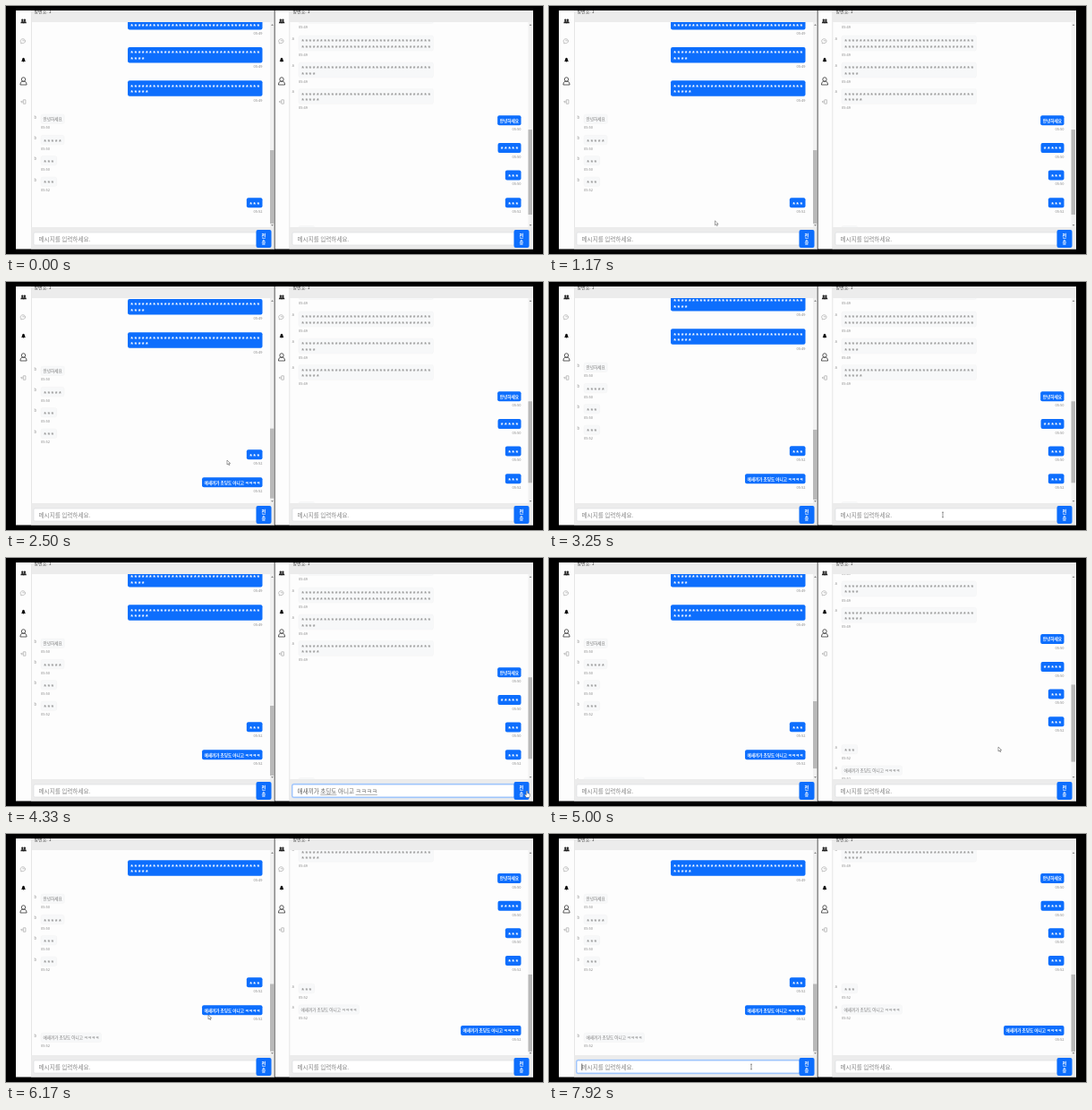
Animation, 600 px wide and 277 px high, one loop 8000 ms. Source, as an HTML page with a canvas:

```html
<!DOCTYPE html>
<html lang="ko">
<head>
<meta charset="utf-8">
<style>
html, body { margin: 0; width: 100%; height: 100%; overflow: hidden; background: #000; }
canvas { display: block; }
</style>
</head>
<body>
<canvas id="stage" width="600" height="277"></canvas>
<script>
const ctx = document.getElementById('stage').getContext('2d');
const LOOP = 8000, BLUE = '#0d6efd', PITCH = 4.15, PER_LINE = 35, PAD = 2.6;
const FONT = '"Noto Sans CJK KR", "Noto Sans CJK", sans-serif';
const VIEW = { top: 18, bottom: 247, height: 229 };
const INSULT = '애새끼가 초딩도 아니고 ㅋㅋㅋㅋ', HELLO = '안녕하세요';
const SEND_LEFT = 2080, SEND_RIGHT = 4420;

// Messages: [top, own, text or number of stars, time, appears at]
const panels = [
  {
    x: 11, rail: 28, own: 286.5, other: 39, name: 'b', input: 31, inputEnd: 280, bar: 295, end: 300, base: 383,
    messages: [
      [9, 1, 70, '05:49'], [46, 1, 39, '05:49'], [83.3, 1, 40, '05:49'],
      [121, 0, HELLO, '05:50'], [144.3, 0, 5, '05:50'], [167.5, 0, 3, '05:50'], [191, 0, 3, '05:52'],
      [214.3, 1, 3, '05:52'], [245.2, 1, INSULT, '05:52', SEND_LEFT], [276, 0, INSULT, '05:52', SEND_RIGHT + 90]
    ],
    content: t => 612 + (t >= SEND_LEFT) * 31 + (t >= SEND_RIGHT + 90) * 24,
    scroll: t => 27 * ease(t, 2250, 2480) + 4 * ease(t, 2520, 2680) + 23 * ease(t, 5880, 6160),
    focused: t => t >= 1250 && t < SEND_LEFT || t >= 7500,
    typed: t => t < SEND_LEFT ? typing(t, 1330, 1800) : ''
  },
  {
    x: 301, rail: 316.5, own: 575.5, other: 327, name: 'a', input: 320, inputEnd: 568, bar: 583.5, end: 589, base: 275,
    messages: [
      [2.5, 0, 40, '05:49'], [33, 0, 70, '05:49'], [63, 0, 39, '05:49'], [92.4, 0, 40, '05:49'],
      [122.2, 1, HELLO, '05:50'], [153, 1, 5, '05:50'], [183.5, 1, 3, '05:50'], [214.3, 1, 3, '05:52'],
      [245.5, 0, 3, '05:52'], [269, 0, INSULT, '05:52', SEND_LEFT + 80], [292.3, 1, INSULT, '05:52', SEND_RIGHT]
    ],
    content: t => 528 + (t >= SEND_LEFT + 80) * 23 + (t >= SEND_RIGHT) * 31,
    scroll: t => 78.2 * ease(t, 4880, 5320),
    focused: t => t >= 3300 && t < SEND_RIGHT,
    typed: t => t < SEND_RIGHT ? typing(t, 3500, 4060) : '',
    misspelled: true
  }
];

// Pointer path: [time, x, y]
const pointer = [
  [500, 566, 262], [830, 300, 175], [1000, 300, 175], [1250, 150, 260], [1750, 150, 260],
  [1950, 282, 262], [2130, 282, 262], [2400, 247, 199], [2750, 247, 199], [3250, 440, 260],
  [3900, 440, 260], [4250, 582, 262], [4470, 582, 262], [4800, 502, 211], [5580, 502, 211],
  [5880, 226, 202], [6420, 226, 202], [6670, 194, 257], [7250, 194, 257], [7330, 226, 260]
];

const clamp = v => Math.max(0, Math.min(1, v));
const progress = (t, from, to) => clamp((t - from) / (to - from));
const ease = (t, from, to) => { const p = progress(t, from, to); return p * (2 - p); };
const typing = (t, from, to) => INSULT.slice(0, Math.ceil(INSULT.length * progress(t, from, to)));

function rect(x, y, w, h, fill, radius = 0, stroke) {
  ctx.beginPath();
  ctx.roundRect(x, y, w, h, radius);
  ctx.fillStyle = fill;
  ctx.fill();
  if (stroke) { ctx.strokeStyle = stroke; ctx.stroke(); }
}

function text(str, x, y, size, color, align = 'left', weight = 'normal') {
  ctx.font = `${weight} ${size}px ${FONT}`;
  ctx.textAlign = align;
  ctx.textBaseline = 'middle';
  ctx.fillStyle = color;
  ctx.fillText(str, x, y);
}

function stars(count, x, y, color) {
  ctx.font = 'bold 7px "Liberation Sans", sans-serif';
  ctx.textAlign = 'center';
  ctx.textBaseline = 'alphabetic';
  ctx.fillStyle = color;
  for (let i = 0; i < count; i++) {
    const line = Math.floor(i / PER_LINE);
    ctx.fillText('*', x + (i % PER_LINE + 0.5) * PITCH, y + 3.9 + line * 6.2);
  }
}

function shape(d, x, y, fill, stroke, width = 0.8) {
  const path = new Path2D(d);
  ctx.save();
  ctx.translate(x, y);
  ctx.lineWidth = width;
  if (fill) { ctx.fillStyle = fill; ctx.fill(path); }
  if (stroke) { ctx.strokeStyle = stroke; ctx.stroke(path); }
  ctx.restore();
}

function sidebar(x) {
  const person = 'M-1.2 -1.2a1.2 1.2 0 1 1 2.4 0a1.2 1.2 0 1 1 -2.4 0M-2 2.2q0 -2.2 2 -2.2t2 2.2z';
  shape(person, x - 1.2, 17, '#222');
  shape(person, x + 1.4, 17, '#222');
  shape('M-2.6 1.8a2.7 2.4 0 1 1 1.4 .7l-1.6 .4zM-1.2 -.2h2.4', x, 39, null, '#aaa', 0.7);
  shape('M-2.4 1.4q1 -1 1 -2.6q.2 -1.6 1.4 -1.6t1.4 1.6q0 1.6 1 2.6zM-.7 1.8h1.4l-.7 .8z', x, 60.5, '#111');
  shape('M-2.2 -2a2.2 2.3 0 1 1 4.4 0a2.2 2.3 0 1 1 -4.4 0M-3.6 4q0 -3.4 2.2 -3.8h2.8q2.2 .4 2.2 3.8z', x, 84, null, '#333');
  shape('M2.4 -2.2h-2.6v4.4h2.6zM-.2 0h-2.6M-1.6 -1.2l-1.2 1.2l1.2 1.2', x, 107, null, '#aaa', 0.7);
}

function message(panel, [top, own, body, time], shift) {
  const y = top - shift, isText = typeof body === 'string';
  ctx.font = `4.6px ${FONT}`;
  const w = 2 * PAD + (isText ? ctx.measureText(body).width : Math.min(body, PER_LINE) * PITCH);
  const h = (own ? 11 : 10.5) + (body > PER_LINE ? 6.5 : 0);
  const x = own ? panel.own - w : panel.other;
  ctx.lineWidth = 0.5;
  rect(x, y, w, h, own ? BLUE : '#f7f8f9', 2, own ? null : '#f2f2f3');
  if (isText) text(body, x + w / 2, y + 5.6, 4.6, own ? '#fff' : '#777', 'center', own ? 'bold' : 'normal');
  else stars(body, x + PAD, y + 5.4, own ? '#fff' : '#999');
  if (!own) text(panel.name, panel.other - 7.5, y + 3, 4, '#888');
  text(time, own ? panel.own : panel.other, y + h + 4.4, 4, '#888', own ? 'right' : 'left');
}

function inputBar(panel, t) {
  const { rail, input: x, inputEnd: end } = panel, focused = panel.focused(t), typed = panel.typed(t);
  rect(rail + 0.5, VIEW.bottom, panel.end - rail - 0.5, 24.5, '#ececec');
  if (focused) rect(x - 1, 251.8, end - x + 2, 16.4, '#b5d2fc', 2.5);
  ctx.lineWidth = 0.6;
  rect(x, 253, end - x, 14, '#fff', 1.5, focused ? '#6ea5f8' : '#d8dbde');
  text(typed || '메시지를 입력하세요.', x + 5.5, 260.3, 6.6, typed ? '#666' : '#888');
  if (typed && panel.misspelled) {
    [[5, 8], [13, 17]].forEach(([from, to]) => {
      const start = ctx.measureText(typed.slice(0, from)).width;
      const stop = ctx.measureText(typed.slice(0, to)).width;
      rect(x + 5.5 + start, 264, stop - start, 0.6, '#888');
    });
  }
  if (focused && (t > 7500 || typed.length < INSULT.length)) {
    rect(x + 5.5 + (typed ? ctx.measureText(typed).width : 0), 256.5, 0.7, 7.5, '#222');
  }
  rect(end - 0.5, 250, 17, 20, BLUE, 2);
  text('전', end + 8, 257.3, 5.2, '#fff', 'center', 'bold');
  text('송', end + 8, 264.2, 5.2, '#fff', 'center', 'bold');
}

function scrollbar(panel, t) {
  const x = panel.bar, total = panel.content(t);
  rect(x, VIEW.top, 5, VIEW.height, '#f1f1f1');
  rect(x, 24 + 219 * (panel.base + panel.scroll(t)) / total, 4.5, 219 * VIEW.height / total, '#b9b9b9');
  shape('M-1.3 .8L0 -.8L1.3 .8z', x + 2.5, 21, '#666');
  shape('M-1.3 -.8L0 .8L1.3 -.8z', x + 2.5, 245, '#666');
}

function clipped(x, y, w, h, paint) {
  ctx.save();
  ctx.beginPath();
  ctx.rect(x, y, w, h);
  ctx.clip();
  paint();
  ctx.restore();
}

function drawPanel(panel, t) {
  const { x, rail, end } = panel, left = rail + 0.5, width = end - left;
  rect(x, 5, end - x, 266.5, '#fdfdfd');
  rect(rail, 5, 0.7, 266.5, '#dcdcdc');
  sidebar(rail - 8.5);
  clipped(left, VIEW.top, width, VIEW.height, () => {
    panel.messages.filter(m => t >= (m[4] || 0)).forEach(m => message(panel, m, panel.scroll(t)));
  });
  scrollbar(panel, t);
  clipped(left, 5, width, VIEW.top - 5, () => {
    rect(left, 5, width, 13.5, '#ececec');
    text('방번호: 1', panel.input + 0.5, 6.4, 5, '#444');
  });
  inputBar(panel, t);
}

function drawPointer(t) {
  if (t < pointer[0][0]) return;
  let i = pointer.findIndex(p => p[0] > t);
  if (i < 0) i = pointer.length - 1;
  const [t0, x0, y0] = pointer[i - 1], [t1, x1, y1] = pointer[i];
  const p = progress(t, t0, t1), k = p * p * (3 - 2 * p);
  const x = x0 + (x1 - x0) * k, y = y0 + (y1 - y0) * k;
  const over = (from, to) => panels.some(q => y > 252 && x >= q[from] && x <= (to ? q[to] : q[from] + 16));
  if (over('inputEnd')) {
    shape('M-.7 -1.5q.7 -.8 1.4 0v2.2l2.6 .8v2.4l-.8 1.6h-3.2l-2 -3l.6 -.6l1.4 .9z', x, y, '#fff', '#333', 0.4);
  } else if (over('input', 'inputEnd')) {
    shape('M-1 -2.8h2M0 -2.8v5.6M-1 2.8h2', x, y, null, '#555', 0.6);
  } else {
    shape('M0 0v5l1.2 -1.1l.8 1.8l.9 -.4l-.8 -1.7h1.6z', x, y, '#fff', '#666', 0.6);
  }
}

function draw(now) {
  const t = now % LOOP;
  rect(0, 0, 600, 277, '#000');
  panels.forEach(panel => drawPanel(panel, t));
  rect(299.5, 5, 1.5, 266.5, '#888');
  drawPointer(t);
  requestAnimationFrame(draw);
}
requestAnimationFrame(draw);
</script>
</body>
</html>
```
